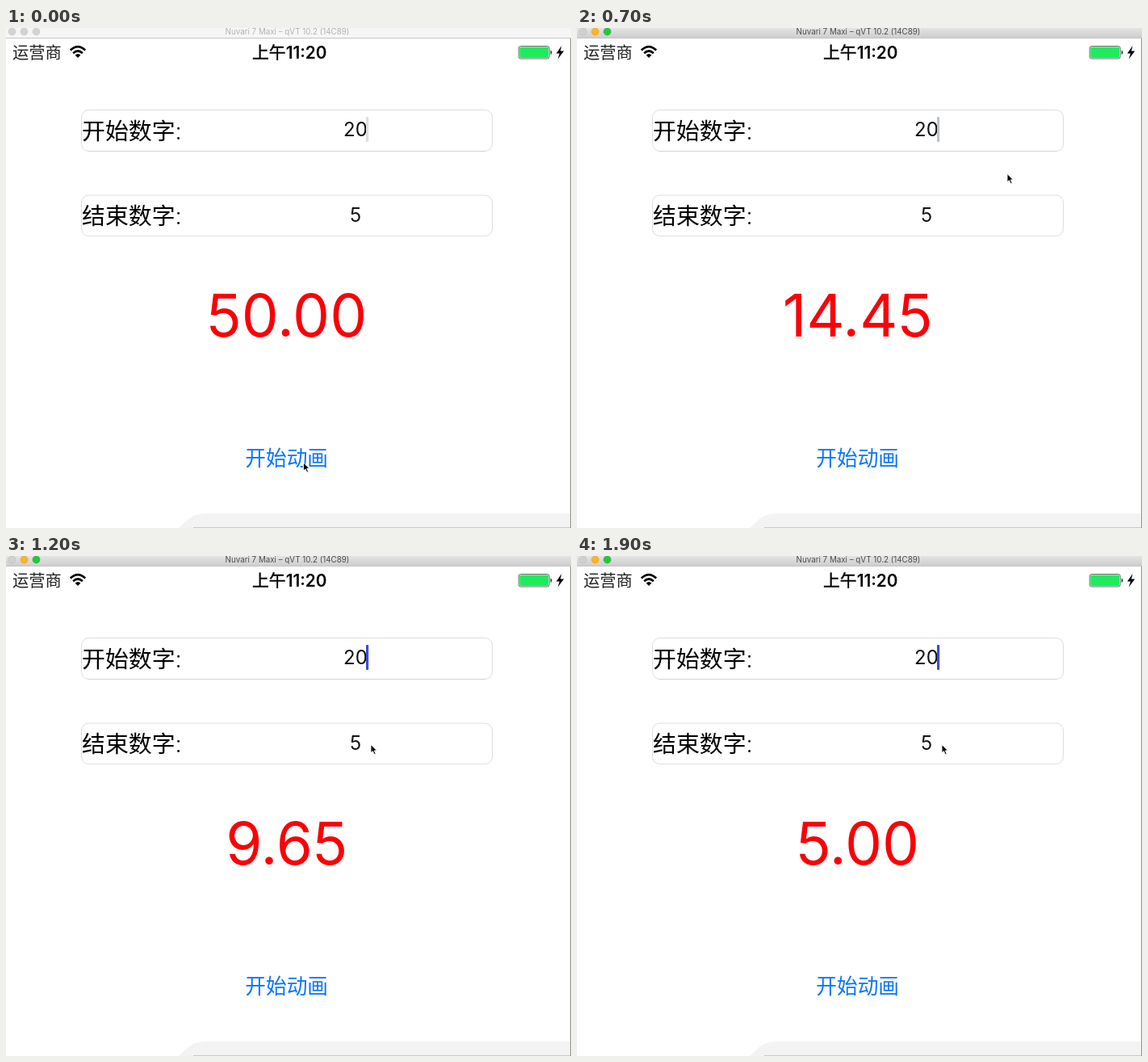
An HTML page that plays this animation: 700x619 px, repeating every 2000 ms.

```html
<!DOCTYPE html>
<html lang="zh-CN">
<head>
<meta charset="utf-8">
<title>数字动画</title>
<style>
  html, body { margin: 0; width: 100%; height: 100%; overflow: hidden; background: #fff; }
  svg { display: block; width: 100vw; height: 100vh; }
  text { font-family: Inter, "Noto Sans CJK SC", "Noto Sans CJK", sans-serif; }
  .middle { text-anchor: middle; }
  .label { font-size: 28.9px; font-weight: 350; }
  .input { font-size: 24px; fill: #111; }
  .field { fill: #fff; stroke: #dedede; }
  .time { font-size: 20.8px; font-weight: 600; }
  .time tspan { font-weight: 500; stroke: #000; stroke-width: .4; }
  #bar { fill: url(#active); }
  #title { font-size: 9.8px; fill: #4c4c4c; }
  .inactive #bar { fill: #f6f6f6; }
  .inactive #title { fill: #b2b2b2; }
  .inactive .light { fill: #d3d3d3; stroke: #c6c6c6; }
  #number { font-size: 73px; fill: #fb0007; }
  #button { font-size: 25.7px; font-weight: 350; fill: #0a74f8; }
</style>
</head>
<body>
<svg id="stage" viewBox="0 0 700 619" preserveAspectRatio="none">
  <defs>
    <linearGradient id="active" x2="0" y2="1">
      <stop stop-color="#e4e4e4"/>
      <stop offset="1" stop-color="#cecece"/>
    </linearGradient>
  </defs>

  <rect width="700" height="619" fill="#fff"/>
  <rect id="bar" width="700" height="12"/>
  <path d="M0 12.5H700" stroke="#c4c4c4"/>
  <g stroke-width=".6">
    <circle class="light" cx="7.5" cy="4.5" r="4.5" fill="#d0d0d0" stroke="#bcbcbc"/>
    <circle class="light" cx="22.5" cy="4.5" r="4.5" fill="#fdb424" stroke="#e09e22"/>
    <circle class="light" cx="37.5" cy="4.5" r="4.5" fill="#27c73c" stroke="#1fab30"/>
  </g>
  <text id="title" class="middle" x="348.5" y="8">Nuvari 7 Maxi – qVT 10.2 (14C89)</text>

  <text x="8" y="38" font-size="20.3" font-weight="350" fill="#222">运营商</text>
  <g fill="none" stroke="#000" stroke-width="2.7">
    <path d="M79.8 27.4Q89 18.8 98.2 27.4"/>
    <path d="M83.2 31.2Q89 25.8 94.8 31.2"/>
  </g>
  <path d="M85.6 33.4Q89 30.4 92.4 33.4L89 37Z"/>
  <text class="time middle" x="351.3" y="38"><tspan>上午</tspan>11:20</text>
  <rect x="635.2" y="22.5" width="38" height="15.5" rx="2.5" fill="#fff" stroke="#6a6a6a"/>
  <rect x="636.2" y="23.5" width="36" height="13.5" rx="1.5" fill="#1eec5f"/>
  <path d="M674.6 27.5q1.8 .6 1.8 2.8t-1.8 2.8Z" fill="#333"/>
  <path d="M688.4 22L681.8 31.4H685.8L683.6 38.6L691.2 28.4H686.8Z"/>

  <rect class="field" x="93.5" y="101.5" width="509" height="51" rx="9"/>
  <rect class="field" x="93.5" y="207" width="509" height="50.5" rx="9"/>
  <path d="M102 152.5H594" stroke="#d2d2d2"/>
  <text class="label" x="94" y="138">开始数字:</text>
  <text class="label" x="94" y="243">结束数字:</text>
  <text class="input middle" x="433" y="134">20</text>
  <text class="input middle" x="433" y="240">5</text>
  <rect id="caret" x="446" y="110" width="3.2" height="31" rx="1"/>

  <text id="number" class="middle" x="347.8" y="382"></text>
  <text id="button" class="middle" x="347.7" y="542.2">开始动画</text>

  <path d="M214 619C222 612 229 601 247 601H699V619Z" fill="#f3f3f3"/>
  <path d="M232 618.5H700" stroke="#c8c8c8"/>
  <path d="M699.5 13V619" stroke="#8e8e8e"/>

  <path id="cursor" d="M0 0V10.2L2.4 8L4.3 12.2L6.1 11.4L4.3 7.4H7.5Z" stroke="#fff" stroke-width=".9"/>
</svg>

<script>
  const LOOP = 2000, STEP = 100, BLINK = 750;
  const byId = id => document.getElementById(id);
  const [stage, number, button, caret, cursor] =
    ['stage', 'number', 'button', 'caret', 'cursor'].map(byId);

  // Each stop is [from time, value]; the latest one reached holds.
  const hold = (stops, t) => stops.filter(([from]) => t >= from).pop()[1];

  const pointer = [
    [0, [368.5, 538]], [600, [374, 532]], [700, [533, 180.5]],
    [800, [497, 204]], [900, [460, 229]], [1000, [452, 233.5]]
  ];
  const buttonAlpha = [[0, 1], [100, 0.2], [200, 0.84], [300, 1]];
  const caretColor = [
    [0, '#dedfe3'], [50, '#e6e6e8'], [150, '#bfc9d8'], [200, '#8fabd8'],
    [250, '#3d4bd4'], [600, '#6a80d6'], [650, '#9ab2dc'], [700, '#bcc3cd']
  ];

  // The count falls by 0.15 per tick from 20 to 5.
  function valueAt(t) {
    if (t < 200) return 50;
    const ticks = Math.floor(5.3 + (t - 200) * 0.06417);
    return Math.max(5, 20 - ticks * 0.15);
  }

  function draw(t) {
    stage.classList.toggle('inactive', t < 100);
    number.textContent = valueAt(t).toFixed(2);
    button.style.opacity = hold(buttonAlpha, t);
    caret.style.fill = hold(caretColor, t % BLINK);
    cursor.setAttribute('transform', `translate(${hold(pointer, t)})`);
  }

  const start = performance.now();
  function tick() {
    const t = (performance.now() - start) % LOOP;
    draw(Math.floor(t / STEP) * STEP);
    requestAnimationFrame(tick);
  }
  tick();
</script>
</body>
</html>
```
